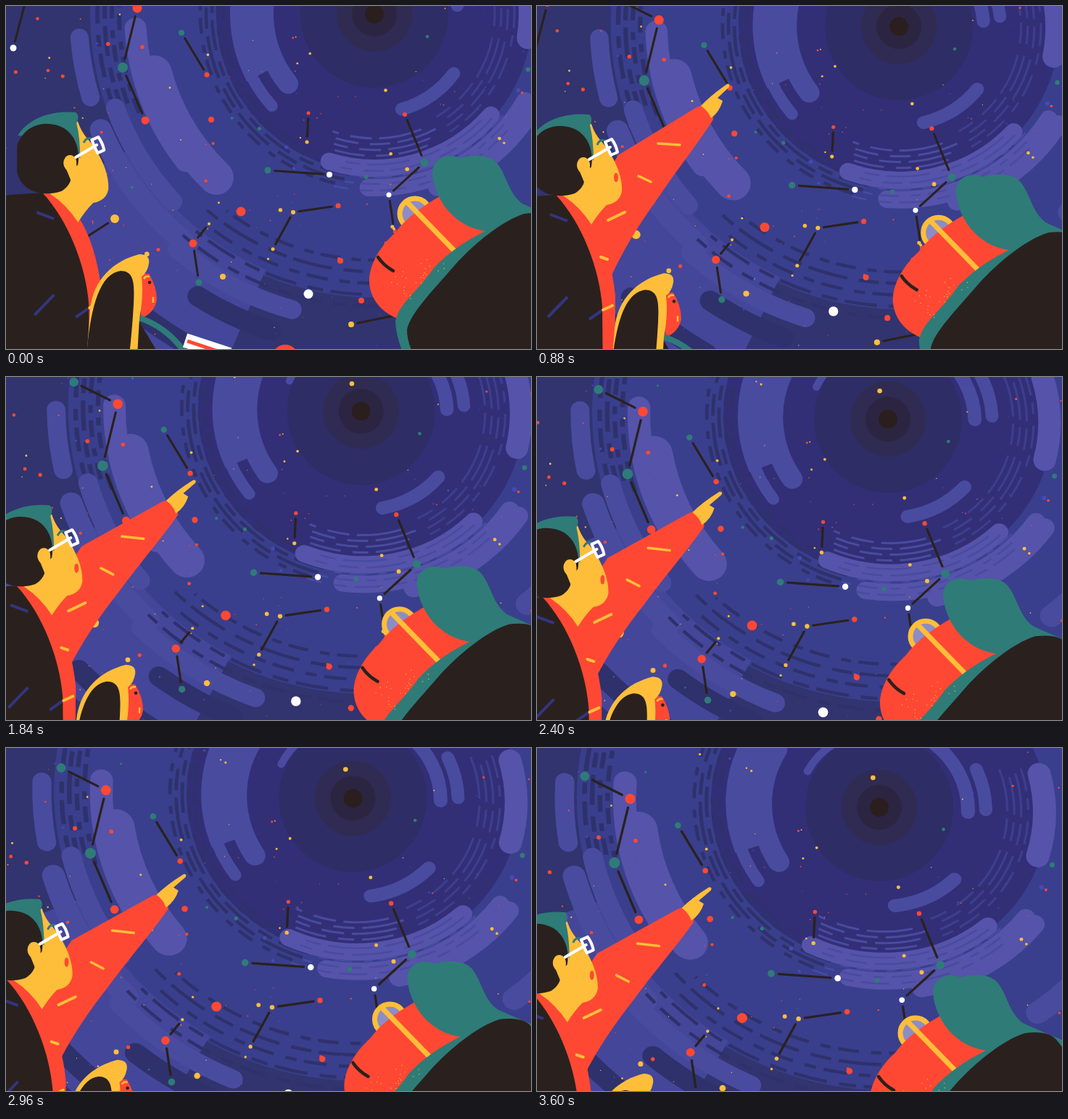
An HTML page for the animation above (3680 ms loop, 724 by 474 pixels).

```html
<!DOCTYPE html>
<html>
<head>
<meta charset="utf-8">
<style>
html, body { margin: 0; width: 100%; height: 100%; overflow: hidden; background: #31346f; }
svg { display: block; width: 724px; height: 474px; }
</style>
</head>
<body>
<svg viewBox="0 0 724 474" xmlns="http://www.w3.org/2000/svg">
  <g id="swirl"></g>
  <g id="hole"></g>
  <g id="stars"></g>

  <g id="hooded">
    <circle cx="564" cy="287" r="21" fill="#8d8cc6" stroke="#ffbe3a" stroke-width="7"/>
    <path fill="#ff4833" d="M604 260C578 274 554 290 536 314C516 332 500 358 501 382C503 408 520 424 540 432L640 350L668 312Z"/>
    <path fill="none" stroke="#ffbe3a" stroke-width="7" d="M553 271L618 338"/>
    <path fill="none" stroke="#2a211e" stroke-width="4.5" stroke-linecap="round" d="M513 347Q521 359 534 366"/>
    <path fill="#2f7b78" d="M588 232C587 212 606 202 626 210C646 204 668 206 677 217C691 234 692 258 712 273Q735 284 790 306L790 400L560 600L556 500Q538 462 537 436C542 410 568 395 590 362Q618 332 661 311C622 306 592 272 588 232Z"/>
    <path fill="#2a211e" d="M800 350L759 297Q748 283 715 287C685 296 646 328 619 358C590 392 556 426 553 448Q553 470 572 500L800 500Z"/>
    <g id="specks"></g>
  </g>

  <g id="man">
    <g id="arm">
      <path fill="#ff4833" d="M60 290L112 206L220 140Q230 135 236 140Q243 148 243 157C222 190 196 222 165 268Q126 322 103 372L85 380Z"/>
      <path fill="#ffbe3a" d="M226 138Q240 123 262 108Q267 107 265 112L249 127L256 131Q252 146 240 155Q236 145 226 138Z"/>
      <path fill="none" stroke="#ffbe3a" stroke-width="3.5" stroke-linecap="round" d="M167 190L197 192M140 235L157 243"/>
    </g>
    <path fill="#ff4833" d="M25 260L45 262C78 284 100 330 108 400L107 520L60 520Z"/>
    <path fill="#2a211e" d="M-70 280L-20 264L26 261C62 300 86 362 90 416L91 520L-70 520Z"/>
    <path fill="none" stroke="#33357f" stroke-width="4" d="M18 288L42 297M15 430L42 402M72 433L89 421"/>
    <path fill="none" stroke="#ffbe3a" stroke-width="4" stroke-linecap="round" d="M91 420L104 414"/>
    <path id="chest" fill="none" stroke="#ffbe3a" stroke-width="4" stroke-linecap="round" d="M98 296L121 285M88 347L97 350"/>
    <path fill="#ffbe3a" d="M66 160L75 163C82 184 92 188 100 202Q118 232 117 256Q114 272 96 275Q85 286 75 302Q60 278 36 262L55 218Z"/>
    <path fill="#2f7b78" d="M-8 182C8 156 42 147 72 150Q78 155 73 165Q78 185 78 214L60 190Z"/>
    <path fill="#2a211e" d="M-9 196C2 164 34 160 56 172C73 183 78 204 75 222L66 234Q67 250 52 259C24 268-4 258-9 232Z"/>
    <ellipse cx="64" cy="220" rx="9" ry="11" fill="#ffbe3a"/>
    <path fill="#ffbe3a" d="M57 224L66 246L75 240L72 214Z"/>
    <path fill="none" stroke="#2f7b78" stroke-width="3" d="M83 192Q86 184 94 186"/>
    <path fill="none" stroke="#fff" stroke-width="4" stroke-linecap="round" stroke-linejoin="round" d="M72 212L101 195M94 188L103 184Q109 192 111 202L102 206Q98 198 94 188"/>
    <ellipse id="mouth" cx="109" cy="237" rx="3" ry="6.5" fill="#ff4833"/>
  </g>

  <g id="child">
    <path fill="#ff4833" d="M184 370L197 370Q208 388 208 406Q205 424 186 432Z"/>
    <path fill="#2a211e" d="M180 430L222 500H172Z"/>
    <path fill="none" stroke="#2f7b78" stroke-width="8" d="M184 431Q222 444 246 478"/>
    <path fill="#ffbe3a" d="M116 420C120 378 148 352 184 343Q199 343 197 356Q195 368 187 374Q190 400 184 432L180 500L110 500Z"/>
    <path fill="#2a211e" d="M110 500C114 428 126 370 158 366C178 366 177 386 176 412Q174 450 168 500Z"/>
    <circle cx="198" cy="382" r="2.3" fill="#2a211e"/>
    <path fill="none" stroke="#ffbe3a" stroke-width="2.5" d="M203 402V410M190 377Q193 372 198 374"/>
  </g>
  <g id="sleeve">
    <path fill="none" stroke="#fff" stroke-width="20" d="M247 462L308 482"/>
    <path fill="none" stroke="#ff4833" stroke-width="5" d="M250 463L304 481"/>
    <circle cx="385" cy="486" r="18" fill="#ff4833"/>
  </g>
</svg>
<script>
const $ = id => document.getElementById(id);
const LOOP = 3680, STEP = 80, SPAN = 3600;
const INK = '#2a211e', YELLOW = '#ffbe3a';
const STAR = { R: '#ff4833', Y: YELLOW, G: '#2f7b78', B: '#4549b8', W: '#fff' };
const DARK = '#2f316c', MID = '#494b9f', LIGHT = '#5553aa', SKY = '#393f8c', CORE = '#322f77';

let seed = 11;
const rnd = () => (seed = (seed * 16807) % 2147483647) / 2147483647;
const dot = (x, y, r, c) => `<circle cx="${x}" cy="${y}" r="${r}" fill="${c}"/>`;

// Arc around the hole, angles in degrees clockwise from the right.
function arc(r, a, b, w, c, cap = 'round', dash = '') {
  const at = d => {
    const q = d * Math.PI / 180;
    return (r * Math.cos(q)).toFixed(1) + ' ' + (r * Math.sin(q)).toFixed(1);
  };
  return `<path d="M${at(a)}A${r} ${r} 0 0 1 ${at(b)}" fill="none" stroke="${c}"` +
    ` stroke-width="${w}" stroke-linecap="${cap}" stroke-dasharray="${dash}"/>`;
}

// Concentric broken lines with random lengths.
function dashes(r0, r1, gap, a, b, w, c) {
  let s = '';
  for (let r = r0; r <= r1; r += gap) {
    const on = 22 + rnd() * 40;
    s += arc(r, a + rnd() * 7, b - rnd() * 7, w, c, 'butt', `${on | 0} 10 ${on * 0.5 | 0} 16`);
  }
  return s;
}

function buildSwirl() {
  $('swirl').innerHTML =
    dot(0, 0, 392, SKY) +
    // lower left
    arc(470, 113, 151, 172, '#44469a', 'butt') +
    arc(410, 130, 157, 30, MID) +
    arc(424, 105.5, 130, 26, MID) +
    arc(460, 108, 122, 28, DARK) +
    arc(525, 118, 132, 28, DARK) +
    // far ring
    dashes(352, 384, 10, 154, 192, 6, DARK) +
    dashes(340, 404, 16, 62, 131, 4.5, DARK) +
    // left
    arc(408, 163.6, 175.4, 25, MID) +
    arc(380, 137, 160, 26, MID) +
    arc(330, 142, 176.5, 30, LIGHT) +
    arc(314, 134, 165, 48, LIGHT) +
    arc(345, 25, 46, 30, MID) +
    // near ring
    dot(0, 0, 218, CORE) +
    dashes(208, 240, 8, 98, 203, 4.5, DARK) +
    dashes(166, 194, 9, -30, 60, 3, '#3d3f8d') +
    dashes(172, 196, 8, 62, 112, 3, MID) +
    arc(176, 152, 200, 46, MID, 'butt') +
    arc(190, 138, 158, 16, MID) +
    arc(153, 141, 202, 28, MID) +
    arc(137, 37, 74, 18, MID) +
    arc(115, -60, -6, 18, MID) +
    arc(138, -32, -8, 17, MID) +
    arc(104, 199, 235, 10, MID) +
    // right and below
    arc(214, -22, 9, 30, LIGHT) +
    arc(240, 30, 92, 24, LIGHT) +
    arc(254, 30, 70, 26, LIGHT) +
    arc(213, 41, 107, 24, LIGHT) +
    dashes(208, 244, 9, 38, 104, 2.5, MID);
  for (const [r, c] of [[102, '#2f2d65'], [52, '#302b52'], [31, '#2c2542'], [13, '#2a1f1e']])
    $('hole').innerHTML += dot(0, 0, r, c);
}

// One constellation per line: colour, x, y, radius. Neighbours are joined.
const SKY_MAP = `
  G 123 -26 6, R 181 3 6.5, G 161 85 7, R 192 158 5.5
  G 242 37 4, R 277 95 3.5
  R 30 -18 3, W 10 58 4.5
  Y 150 294 6, R 102 325 2
  G 361 227 4.5, W 446 233 4
  Y 368 336 2.5, Y 396 285 3, R 458 276 3.5
  Y 280 301 2, R 258 328 5.5, G 266 382 4.5
  R 417 148 2.5, Y 415 188 2.5
  R 550 150 3, G 577 216 5.5, W 528 261 3.5, Y 535 308 2
  Y 476 440 4, R 540 427 3
  R 324 284 6.5
  W 417 398 6.5
  R 490 407 4
  R 461 352 4
  R 283 157 4
  Y 299 374 4`;

function link(p, q) {
  const dx = q.x - p.x, dy = q.y - p.y, d = Math.hypot(dx, dy);
  const a = (p.r + 5) / d, b = 1 - (q.r + 5) / d;
  return `<path d="M${p.x + dx * a} ${p.y + dy * a}L${p.x + dx * b} ${p.y + dy * b}"` +
    ` stroke="${INK}" stroke-width="3" stroke-linecap="round"/>`;
}

function buildStars() {
  let s = '';
  const hues = 'RYGBYR';
  for (let i = 0; i < 210; i++) {
    const r = 0.6 + 2.8 * rnd() ** 3;
    s += dot((rnd() * 800).toFixed(1), (rnd() * 570 - 95).toFixed(1), r.toFixed(1), STAR[hues[i % 6]]);
  }
  for (const line of SKY_MAP.trim().split('\n')) {
    const chain = line.trim().split(', ').map(p => {
      const [c, x, y, r] = p.split(' ');
      return { c, x: +x, y: +y, r: +r };
    });
    chain.forEach((p, i) => {
      if (i) s += link(chain[i - 1], p);
      s += dot(p.x, p.y, p.r, STAR[p.c]);
    });
  }
  $('stars').innerHTML = s;
}

function buildSpecks() {
  let s = '';
  for (let i = 0; i < 26; i++) {
    const u = rnd(), v = rnd();
    s += dot((520 + u * 55 + v * 45).toFixed(1), (390 - u * 55 + v * 20).toFixed(1), 0.7, YELLOW);
  }
  $('specks').innerHTML = s;
}

const smooth = x => { x = Math.min(1, Math.max(0, x)); return x * x * (3 - 2 * x); };
const place = (id, v) => $(id).setAttribute('transform', v);
const move = (id, x, y) => place(id, `translate(${x} ${y})`);

// The pointing arm lifts briefly, then settles a little lower.
const aim = t => 2.5 * smooth((t - 900) / 900) - 4.5 * Math.exp(-(((t - 1440) / 200) ** 2));

function draw(t) {
  const k = t / SPAN, raise = smooth((t - 160) / 560), rest = 1 - raise;
  const cx = 508 - 36 * k, cy = 11 + 71 * k;
  place('swirl', `matrix(${1 + .055 * k} ${.165 * k} ${-.14 * k} ${1 - .015 * k} ${cx} ${cy})`);
  move('hole', cx, cy);
  place('stars', `translate(${-67 * k} ${67 * k}) scale(${1 + .08 * k} ${1 + .078 * k})`);
  move('hooded', -42 * k, 107 * k);
  move('child', -37 * k, 107 * k);
  move('sleeve', -37 * k, 107 * k);
  const m = (t - 880) / SPAN;
  move('man', -44 * m + 13.5 * rest, 102 * m + 22 * rest);
  place('arm', `translate(95 300) rotate(${130 * rest + aim(t)}) scale(${.02 + .98 * raise}) translate(-95 -300)`);
  $('mouth').setAttribute('opacity', raise);
  $('chest').setAttribute('opacity', raise);
}

buildSwirl();
buildStars();
buildSpecks();
const start = performance.now();
function tick() {
  const t = (performance.now() - start) % LOOP;
  draw(Math.floor(t / STEP) * STEP);
  requestAnimationFrame(tick);
}
draw(0);
requestAnimationFrame(tick);
</script>
</body>
</html>
```
